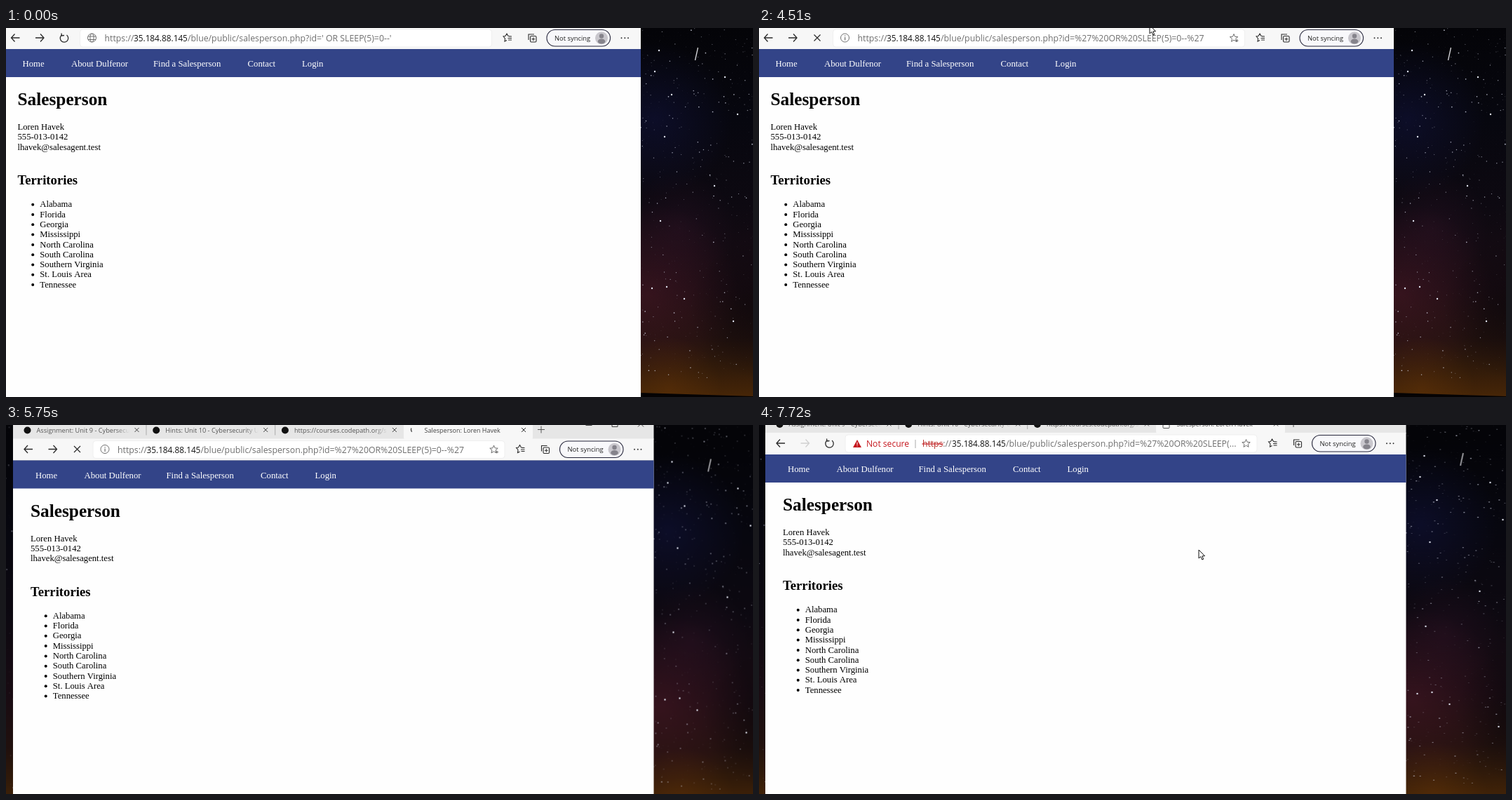
An HTML page with a canvas that plays this animation: 1065 by 526 pixels, repeating every 8000 ms.

```html
<!DOCTYPE html>
<html lang="en">
<head>
<meta charset="utf-8">
<title>Salesperson page</title>
<style>
html, body { margin: 0; width: 100%; height: 100%; overflow: hidden; background: #08070c; }
canvas { display: block; }
</style>
</head>
<body>
<canvas id="stage" width="1065" height="526"></canvas>
<script>
const ctx = document.getElementById('stage').getContext('2d');
const LOOP = 8000, PAD = 30, TAU = Math.PI * 2;
const LOAD_START = 2450, LOAD_END = 7590;
const SANS = '"Open Sans", "Noto Sans", sans-serif';
const SERIF = '"Liberation Serif", "Times New Roman", serif';
const INK = '#2b2b2b', GREY = '#6e6e6e';
const PERSON = 'Loren Havek';

// [time, pan x, pan y]
const CAMERA = [
  [0, 0, 0], [5290, 5, 4], [5390, 12, 11], [5500, 19, 18.5], [5620, 19, 20],
  [5750, 18.5, 20.5], [5900, 18, 20.5], [6020, 17.5, 20.5], [6150, 17.5, 20],
  [6280, 17.5, 16], [6410, 17.5, 12]
];

// [time, x, y, shape]
const POINTER = [
  [0, 0, 0, ''], [130, 958, 505, 'arrow'], [250, 900, 440, 'arrow'], [370, 800, 320, 'arrow'],
  [500, 710, 190, 'arrow'], [630, 650, 110, 'arrow'], [750, 612, 60, 'arrow'],
  [870, 595, 36, 'arrow'], [1020, 592, 36, 'arrow'], [1160, 590, 33, 'arrow'],
  [1280, 588, 26, 'beam'], [1410, 584, 20, 'beam'], [1530, 580, 17, 'beam'],
  [1650, 577, 16, 'beam'], [1780, 577, 16, 'click'], [1920, 575, 20, 'beam'],
  [2050, 572, 24, 'beam'], [4510, 557, -4, 'arrow'], [4620, 0, 0, ''],
  [6930, 614, 57, 'arrow'], [7070, 617, 90, 'arrow'], [7200, 622, 132, 'arrow'],
  [7320, 626, 163, 'arrow'], [7470, 627, 175, 'arrow'], [7590, 627, 178, 'arrow']
];

const stepAt = (keys, t) => keys.reduce((now, key) => key[0] <= t ? key : now);

function text(str, x, y, size, color, family = SANS, weight = '') {
  ctx.font = `${weight} ${size}px ${family}`;
  ctx.fillStyle = color;
  ctx.fillText(str, x, y);
}

function rect(x, y, w, h, color) {
  ctx.fillStyle = color;
  ctx.fillRect(x, y, w, h);
}

function roundRect(x, y, w, h, r, fill, line) {
  ctx.beginPath();
  ctx.roundRect(x, y, w, h, r);
  if (fill) { ctx.fillStyle = fill; ctx.fill(); }
  if (line) { ctx.strokeStyle = line; ctx.stroke(); }
}

function dot(x, y, r, color, c = ctx) {
  c.fillStyle = color;
  c.beginPath();
  c.arc(x, y, r, 0, TAU);
  c.fill();
}

// Each path is a flat list of points: x0, y0, x1, y1, ...
function lines(color, width, ...paths) {
  ctx.strokeStyle = color;
  ctx.lineWidth = width;
  ctx.beginPath();
  for (const p of paths)
    for (let i = 0; i < p.length; i += 2)
      i ? ctx.lineTo(p[i], p[i + 1]) : ctx.moveTo(p[i], p[i + 1]);
  ctx.stroke();
}

function arc(x, y, r, from, to, color, width) {
  ctx.strokeStyle = color;
  ctx.lineWidth = width;
  ctx.beginPath();
  ctx.arc(x, y, r, from, to);
  ctx.stroke();
}

const cross = (x, y, r, color, width) =>
  lines(color, width, [x - r, y - r, x + r, y + r], [x + r, y - r, x - r, y + r]);
const plus = (x, y, r, color, width) =>
  lines(color, width, [x - r, y, x + r, y], [x, y - r, x, y + r]);

function star(x, y, r) {
  const p = [];
  for (let i = 0; i <= 10; i++) {
    const a = -Math.PI / 2 + i * Math.PI / 5, q = i % 2 ? r * 0.45 : r;
    p.push(x + q * Math.cos(a), y + q * Math.sin(a));
  }
  lines(GREY, 1, p);
}

function makeSky() {
  const sky = document.createElement('canvas');
  sky.width = 1065 + PAD;
  sky.height = 526 + PAD;
  const c = sky.getContext('2d');
  c.translate(PAD, PAD);
  const base = c.createLinearGradient(0, 0, 0, 526);
  [[0, '#040408'], [0.25, '#07070f'], [0.48, '#0d0911'], [0.7, '#190c13'],
   [0.84, '#21110e'], [0.92, '#301a0a'], [1, '#472607']]
    .forEach(([at, color]) => base.addColorStop(at, color));
  c.fillStyle = base;
  c.fillRect(-PAD, -PAD, sky.width, sky.height);

  const glow = (x, y, r, rgb, alpha) => {
    const g = c.createRadialGradient(x, y, 0, x, y, r);
    g.addColorStop(0, `rgba(${rgb},${alpha})`);
    g.addColorStop(1, `rgba(${rgb},0)`);
    c.fillStyle = g;
    c.fillRect(x - r, y - r, r * 2, r * 2);
  };
  glow(925, 130, 110, '18,20,64', 0.5);
  glow(915, 380, 130, '80,26,40', 0.5);
  glow(960, 285, 80, '52,20,42', 0.35);
  glow(945, 515, 75, '112,58,8', 0.35);
  glow(1075, 400, 100, '5,4,8', 0.5);

  let seed = 41;
  const rnd = () => (seed = seed * 16807 % 2147483647) / 2147483647;
  const scatter = (n, x, w) => {
    for (let i = 0; i < n; i++) {
      const sx = x + rnd() * w, sy = Math.pow(rnd(), 1.25) * 520 - 20;
      const b = rnd();
      dot(sx, sy, 0.35 + 0.5 * b * b, `rgba(215,218,235,${0.15 + 0.7 * b * b})`, c);
    }
  };
  scatter(520, 905, 160);
  scatter(34, -PAD, 24);
  [[933, 275], [939, 155], [942, 369], [921, 371], [1037, 418], [949, 95],
   [925, 62], [1010, 225], [1043, 123], [967, 386], [931, 32], [1025, 70]]
    .forEach(([x, y]) => dot(x, y, 1.2, '#dfe2ee', c));

  c.strokeStyle = '#d8d8dc';
  c.lineWidth = 1.3;
  c.beginPath();
  c.moveTo(986.5, 28);
  c.lineTo(982.5, 46);
  c.stroke();

  c.fillStyle = '#050304';
  c.beginPath();
  c.moveTo(-PAD, 520);
  c.lineTo(905, 520);
  c.lineTo(1065, 525);
  c.lineTo(1065, 526);
  c.lineTo(-PAD, 526);
  c.fill();
  return sky;
}
const sky = makeSky();

function fadedText(str, x, y, width) {
  const g = ctx.createLinearGradient(x, 0, x + width, 0);
  g.addColorStop(0, '#555');
  g.addColorStop(0.85, '#555');
  g.addColorStop(1, 'rgba(85,85,85,0)');
  text(str, x, y, 9.2, g);
}

function drawTabs(t) {
  rect(-8.5, -45, 913.5, 45, '#e6e6e6');
  ['Assignment: Unit 9 - Cybersecurity', 'Hints: Unit 10 - Cybersecurity Unit', 'https://courses.codepath.org/s']
    .forEach((title, i) => {
      const x = 12 + i * 183.7;
      dot(x, -13, 5, '#111');
      fadedText(title, x + 13, -10, 133);
      cross(x + 156, -13.5, 3, '#444', 1);
      if (i < 2) rect(x + 169, -21, 1, 15, '#aaa');
    });
  roundRect(548.5, -40, 184, 42, 5, '#f7f7f7');
  if (t >= LOAD_END) {
    ctx.lineWidth = 1;
    roundRect(558.5, -18.5, 9, 11, 1, '#fff', '#555');
  } else {
    const turn = t / 900 * TAU;
    arc(564, -14, 5, turn, turn + 0.6 + 0.5 * Math.sin(t / 400), '#555', 1.4);
  }
  text('Salesperson: ' + PERSON, 578, -10, 9, '#444');
  cross(719.5, -13.5, 3, '#333', 1);
  plus(744.5, -14, 5, '#555', 1);
  lines('#444', 1, [808, -20, 817, -20]);
  ctx.lineWidth = 1;
  roundRect(845.5, -26, 8, 8, 0, '', '#444');
  cross(886.5, -22, 4, '#444', 1);
}

function backArrow(x, dir, color) {
  const tip = x - 6 * dir;
  lines(color, 1.3, [tip, 14, x + 6 * dir, 14], [x - dir, 8.5, tip, 14, x - dir, 19.5]);
}

function drawAddress(t, loading, loaded) {
  let ipX = 182;
  const focused = t >= 1410 && t < LOAD_START;
  ctx.lineWidth = 1;
  roundRect(105.5, 2, 587, focused ? 24 : 25, 4, '#fff', focused ? '#a5a5a5' : '#efefef');
  if (loaded) {
    ctx.fillStyle = '#c5161d';
    ctx.beginPath();
    ctx.moveTo(122.5, 9);
    ctx.lineTo(128.5, 20);
    ctx.lineTo(116.5, 20);
    ctx.fill();
    rect(122, 12.5, 1, 4, '#fff');
    rect(122, 17.5, 1, 1, '#fff');
    text('Not secure', 135.5, 19, 12.1, '#c5161d');
    rect(205, 9, 1, 12, '#aaa');
    text('https', 215.5, 19, 12.2, '#b9312b');
    lines('#c5161d', 1.2, [215, 15, 245, 15]);
    text('://', 244.8, 19, 12.2, GREY);
    ipX = 257.5;
  } else {
    arc(122.5, 14, 6, 0, TAU, GREY, 1);
    if (loading) {
      rect(122, 13, 1.2, 4.5, GREY);
      rect(122, 10.5, 1.2, 1.3, GREY);
    } else {
      ctx.beginPath();
      ctx.ellipse(122.5, 14, 2.6, 6, 0, 0, TAU);
      ctx.stroke();
      lines(GREY, 1, [117, 12, 128, 12], [117, 16.5, 128, 16.5]);
    }
    text('https://', 140.5, 19, 12.3, GREY);
  }
  text('35.184.88.145', ipX, 19, 11.8, '#111');
  const query = loaded ? '%27%20OR%20SLEEP(...' : loading ? '%27%20OR%20SLEEP(5)=0--%27' : "' OR SLEEP(5)=0--'";
  text('/blue/public/salesperson.php?id=' + query, ipX + 77, 19, 12.3, GREY);
  if (loading || loaded) {
    star(677, 14.5, 6);
    if (!loaded) plus(681.5, 18, 2, GREY, 1);
  }
}

function drawToolbar(t) {
  const loading = t >= LOAD_START && t < LOAD_END, loaded = t >= LOAD_END;
  rect(-8.5, -1, 913.5, 31, '#f7f7f7');
  backArrow(13.5, 1, INK);
  backArrow(48, -1, loaded ? '#d0d0d0' : INK);
  if (loading) cross(83, 14, 4.5, INK, 1.2);
  else {
    arc(83, 14.5, 5.7, -0.9, 4.1, INK, 1.3);
    lines(INK, 1.3, [79, 7.5, 79.5, 11, 83, 10.5]);
  }
  drawAddress(t, loading, loaded);

  lines(INK, 1.1, [720, 12, 716, 11.5, 714, 8, 712, 11.5, 709, 12, 711.5, 15, 711, 19, 714, 17.5],
    [715.5, 14.5, 721, 14.5], [716, 17, 721, 17], [717, 12, 721, 12]);
  ctx.lineWidth = 1.1;
  roundRect(747.5, 11.5, 8.5, 8.5, 1.5, '', INK);
  lines(INK, 1.1, [745, 17, 745, 9, 753, 9]);
  plus(751.8, 15.8, 2.4, INK, 1);

  ctx.lineWidth = 1.1;
  roundRect(771, 2.5, 90.5, 23.5, 11.7, '#f8f8fb', '#25253a');
  text('Not syncing', 782, 17.8, 9.4, '#222');
  dot(849, 14.3, 9, '#c9c7cd');
  dot(849, 11.5, 3.2, '#85838b');
  ctx.beginPath();
  ctx.ellipse(849, 19, 5.3, 3.6, 0, 0, TAU);
  ctx.fill();
  [877.5, 882.3, 887].forEach(x => dot(x, 14.3, 0.95, INK));
}

function drawPage() {
  rect(-8.5, 30, 913.5, 530, '#fefefe');
  rect(-8.5, 30, 913.5, 40, '#334488');
  [['Home', 23.5], ['About Dulfenor', 93], ['Find a Salesperson', 210], ['Contact', 344.5], ['Login', 422]]
    .forEach(([label, x]) => text(label, x, 55, 12.75, '#fff', SERIF));
  text('Salesperson', 16.5, 110, 25.3, '#000', SERIF, 'bold');
  [PERSON, '555-013-0142', 'lhavek@salesagent.test']
    .forEach((row, i) => text(row, 16.5, 145 + i * 14.3, 12.7, '#000', SERIF));
  text('Territories', 16.5, 223, 18.7, '#000', SERIF, 'bold');
  ['Alabama', 'Florida', 'Georgia', 'Mississippi', 'North Carolina', 'South Carolina',
   'Southern Virginia', 'St. Louis Area', 'Tennessee'].forEach((row, i) => {
    const y = 255.3 + i * 14.3;
    dot(38.2, y - 3.6, 2, '#000');
    text(row, 48.3, y, 12.7, '#000', SERIF);
  });
}

function drawPointer(x, y, shape) {
  if (!shape) return;
  ctx.save();
  ctx.translate(x, y);
  if (shape === 'arrow') {
    ctx.beginPath();
    [[0, 0], [0, 12], [2.8, 9.6], [4.8, 14], [6.7, 13.2], [4.8, 8.9], [8.5, 8.7]]
      .forEach(p => ctx.lineTo(...p));
    ctx.closePath();
    ctx.fillStyle = '#fff';
    ctx.fill();
    ctx.strokeStyle = '#111';
    ctx.lineWidth = 1;
    ctx.stroke();
  } else {
    if (shape === 'click') dot(-1.5, 0, 9, 'rgba(253,241,96,0.92)');
    lines('#111', 1, [-2.5, -5.5, 3.5, -5.5], [0.5, -5.5, 0.5, 6], [-2.5, 6, 3.5, 6]);
  }
  ctx.restore();
}

function draw(t) {
  const [, panX, panY] = stepAt(CAMERA, t);
  ctx.save();
  ctx.translate(panX, panY);
  ctx.drawImage(sky, -PAD, -PAD);
  drawTabs(t);
  drawToolbar(t);
  drawPage();
  ctx.restore();
  drawPointer(...stepAt(POINTER, t).slice(1));
}

const start = performance.now();
function tick() {
  draw((performance.now() - start) % LOOP);
  requestAnimationFrame(tick);
}
tick();
</script>
</body>
</html>
```
